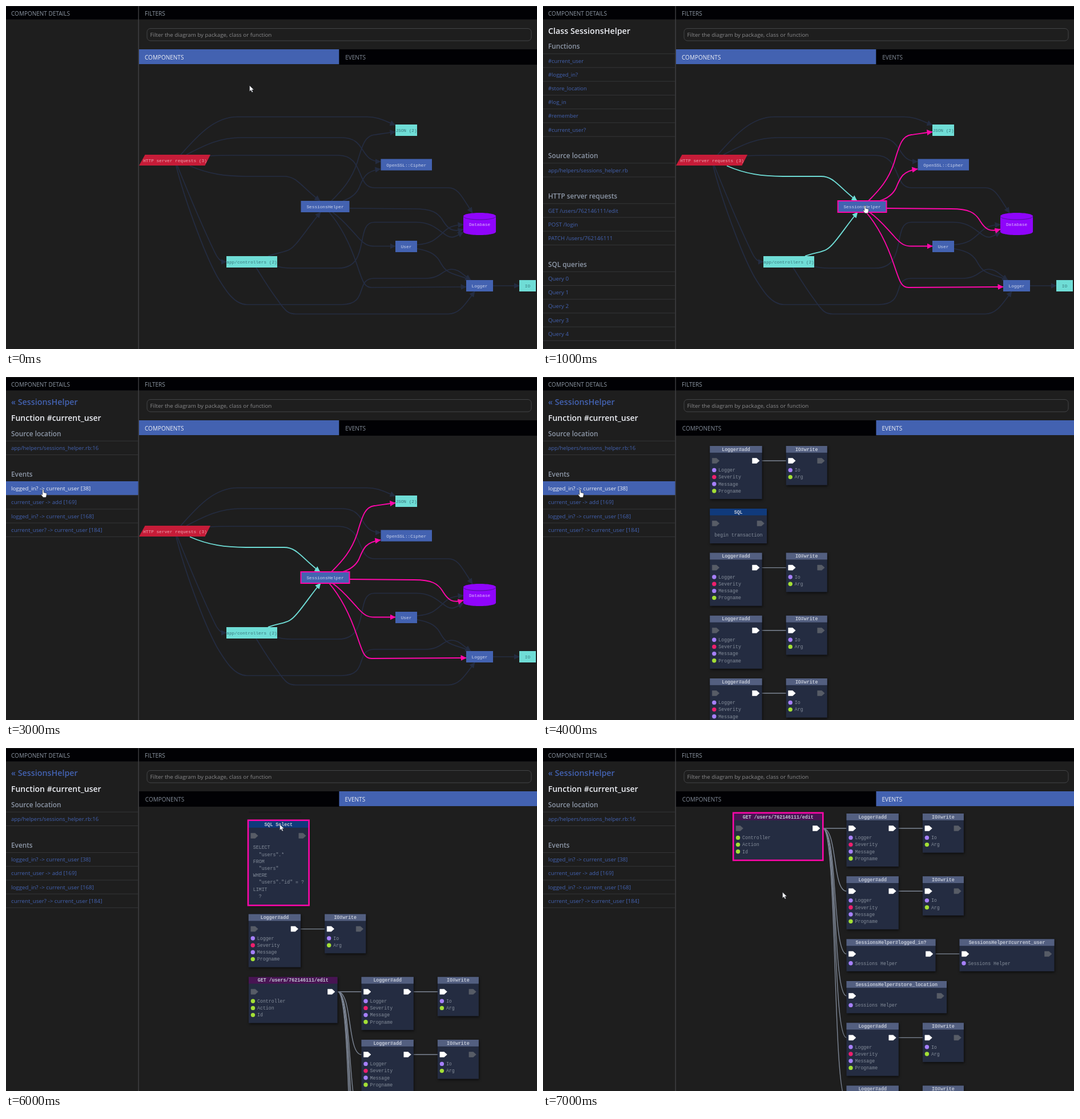
Recreate the animation shown at these times as an HTML page. Size 930 by 602 pixels, loop 8000 ms.

```html
<!DOCTYPE html>
<html lang="en">
<head>
<meta charset="utf-8">
<title>Component diagram</title>
<style>
html, body { margin: 0; width: 100%; height: 100%; overflow: hidden; background: #1e1e1e; }
svg { display: block; width: 930px; height: 602px; }
text { font-family: "Open Sans", "Noto Sans", sans-serif; white-space: pre; }
.mono { font-family: "Liberation Mono", "Courier New", monospace; }
.card { filter: drop-shadow(1px 2px 2px #0009); }
</style>
</head>
<body>
<svg id="stage" viewBox="0 0 930 602"></svg>
<script>
const BLUE = '#4362b1', PINK = '#ff07aa', TEAL = '#6fddd6', DARK = '#242c41';
const PURPLE = '#a680fb', LIME = '#a3df35', RED = '#ed1f6c', GRAY = '#848d9a', WHITE = '#eef0f6';
const stage = document.getElementById('stage');

const rect = (x, y, w, h, fill, extra = '') =>
  `<rect x="${x}" y="${y}" width="${w}" height="${h}" fill="${fill}" ${extra}/>`;
const path = (d, fill, extra = '') => `<path d="${d}" fill="${fill}" ${extra}/>`;
const text = (x, y, s, size, fill, extra = '') =>
  `<text x="${x}" y="${y}" font-size="${size}" fill="${fill}" ${extra}>${s}</text>`;
const mono = (x, y, s, size, fill, extra = '') => text(x, y, s, size, fill, 'class="mono" ' + extra);
const MIDDLE = 'text-anchor="middle"', SEMI = 'font-weight="600"';

// Page frame
function frame(eventsActive) {
  const tab = (x, w, label, on) =>
    rect(x, 76, w, on ? 26 : 27, on ? BLUE : '#010104') +
    text(x + (on ? 10 : 10.8), 93.6, label, 10, on ? WHITE : GRAY);
  return rect(0, 1, 930, 22.5, '#010104') + rect(231.5, 0, 1.3, 602, '#444548') +
    text(9, 16.8, 'COMPONENT DETAILS', 10, '#8f99a5', 'font-weight="500"') +
    text(243, 16.8, 'FILTERS', 10, '#8f99a5', 'font-weight="500"') +
    rect(247, 39.5, 673, 21.5, 'none', 'rx="6" stroke="#434446"') +
    text(252.5, 54, 'Filter the diagram by package, class or function', 9.75, '#8a8a8c') +
    tab(233, 350.5, 'COMPONENTS', !eventsActive) + tab(583.5, 346.5, 'EVENTS', eventsActive);
}

// Sidebar
function section(y, title, items, size = 9.6, active = -1) {
  const top = y + 8.3, step = 24.2;
  let out = text(9, y, title, 11.8, '#8e98a8', SEMI);
  items.forEach((item, i) => {
    const rowY = top + i * step, on = i === active;
    out += rect(0, rowY, 231.5, on ? step : 1, on ? BLUE : '#343537') +
      text(9, rowY + 16.2, item, size, on ? WHITE : BLUE);
  });
  return out + rect(0, top + items.length * step, 231.5, 1, '#343537');
}

const classPanel = active =>
  text(9, 49, 'Class SessionsHelper', 14.3, WHITE, SEMI) +
  section(75, 'Functions', ['#current_user', '#logged_in?', '#store_location', '#log_in',
    '#remember', '#current_user?'], 9.45, active) +
  section(267, 'Source location', ['app/helpers/sessions_helper.rb'], 9.52) +
  section(338, 'HTTP server requests', ['GET /users/762146111/edit', 'POST /login',
    'PATCH /users/762146111'], 9.7) +
  section(457.5, 'SQL queries', [0, 1, 2, 3, 4].map(n => 'Query ' + n), 9.75);

const functionPanel = active =>
  text(9, 49, '« SessionsHelper', 14.3, BLUE, SEMI) +
  text(9, 77, 'Function #current_user', 14, WHITE, SEMI) +
  section(103.5, 'Source location', ['app/helpers/sessions_helper.rb:16'], 9.52) +
  section(174.7, 'Events', ['logged_in? -> current_user [38]', 'current_user -> add [169]',
    'logged_in? -> current_user [168]', 'current_user? -> current_user [184]'], 9.77, active);

// Component graph
const EDGES = [
  'M306 261C335 228 365 194.5 405 194.5H633C650 194.5 660 200 682 209',
  'M316 261C350 243 375 231 412 231H588C632 231 618 273 656 273',
  'M356 263Q375 262 400 262H582C628 262 613 319 645 319H775C793 319 800 338 817 363',
  'M300 280C320 330 350 400 366 433C372 445 376 449 386 449',
  'M298 280C310 330 345 430 370 475C385 500 400 524 422 524H588C637 524 610 478 645 478H735C762 478 765 462 780 462C793 462 798 470 814 481',
  'M475 457Q485 460 500 460H582C640 460 610 379.5 645 379.5H718C748 379.5 758 395 772 403C782 409 788 404 801 397',
  'M438 459C450 478 460 495 475 515C490 537 495 540.5 508 540.5H775C795 540.5 805 522 821 501',
  'M720 419C745 417 752 410 765 398C775 388 782 385 801 383.5',
  'M720 426C745 430 755 438 762 452C773 472 785 469 814 481',
  'M853 491H899'];
const INCOMING = [
  'M322 280.5C355 295 385 299 420 299H487C510 299 518 318 550 342',
  'M459 439C475 433 490 432 497 427C510 420 532 384 551 362'];
const OUTGOING = [
  'M570 342C590 322 605 305 615 275C625 240 630 228 645 226C655 225 662 223 682 221',
  'M590 342C605 337 613 330 618 320C626 300 630 290 656 286',
  'M602 355L715 356C745 356 757 362 766 378C775 392 782 397 801 392',
  'M572 362C590 375 600 388 613 402C628 420 635 421.5 645 421.5H682',
  'M566 362C590 390 605 425 615 455C625 485 628 494 640 494L806 493'];

function graph(selected) {
  const marker = (id, color) => `<marker id="${id}" markerUnits="userSpaceOnUse" markerWidth="10"
    markerHeight="10" refX="9.5" refY="5" orient="auto">${path('M0 0L10 5L0 10z', color)}</marker>`;
  const edges = (list, id, color) => list.map(d =>
    path(d, 'none', `stroke="${color}" stroke-width="${color === DARK ? 1.7 : 1.9}" marker-end="url(#${id})"`)).join('');
  const label = (x, y, s, color) => mono(x, y, s, 7.75, color, MIDDLE);
  const node = (x, y, w, name, teal, extra) =>
    rect(x, y, w, 20, teal ? TEAL : BLUE, extra) +
    label(x + w / 2, y + 13, name, teal ? '#37777c' : '#ccd5ec');
  return marker('plain', DARK) + marker('in', TEAL) + marker('out', PINK) +
    edges(EDGES, 'plain', DARK) +
    edges(INCOMING, selected ? 'in' : 'plain', selected ? TEAL : DARK) +
    edges(OUTGOING, selected ? 'out' : 'plain', selected ? PINK : DARK) +
    path('M243.5 261H358L348.5 280H233z', '#c61c38') +
    label(296, 274, 'HTTP server requests (3)', '#eba8b2') +
    node(682, 208, 38, 'JSON (2)', true) +
    node(656.5, 268.5, 89.5, 'OpenSSL::Cipher') +
    node(516.5, 342, 85, 'SessionsHelper', false, selected ? `stroke="${PINK}" stroke-width="2"` : '') +
    node(682, 412, 38, 'User') +
    node(386, 439, 89, 'app/controllers (2)', true) +
    node(806, 481, 47, 'Logger') +
    node(899, 481, 29, 'IO', true) +
    path('M801 369v27c0 8 57 8 57 0v-27c0-8-57-8-57 0z', '#8f05fb') +
    path('M801 369c0 8 57 8 57 0', 'none', 'stroke="#4d1590"') +
    label(829.5, 386, 'Database', '#dcb9fb');
}

// Event cards
const ROW = 12.2;
const port = (x, y, on) =>
  path(`M${x} ${y - 4.5}h7.5l5 4.5l-5 4.5h-7.5z`, on ? '#fff' : '#575c66',
    `stroke="${on ? '#fff' : '#575c66'}" stroke-width=".6" stroke-linejoin="round"`);
const link = (x0, y0, x1, y1) =>
  path(`M${x0} ${y0}C${x0 + 26} ${y0} ${x1 - 25} ${y1} ${x1} ${y1}`, 'none', 'stroke="#7d8695" stroke-width="1.4"');

function card(x, y, w, h, title, { head = '#535f80', body = '', into, out, selected }) {
  return '<g class="card">' + rect(x, y, w, h, DARK) + rect(x, y, w, 11.8, head) + '</g>' +
    mono(x + w / 2, y + 8.6, title, 8.25, '#c3c9d6', 'font-weight="700" ' + MIDDLE) +
    port(x + 4, y + 26, into) + port(x + w - 17, y + 26, out) + body +
    (selected ? rect(x - .8, y - 1.2, w + 1.6, h + 2.4, 'none', `stroke="${PINK}" stroke-width="2.6"`) : '');
}

function call(x, y, w, title, params, options) {
  const body = params.map(([name, color], i) => {
    const cy = y + 42.4 + i * ROW;
    return `<circle cx="${x + 7.5}" cy="${cy}" r="3.7" fill="${color}"/>` +
      mono(x + 15, cy + 2.8, name, 8.25, GRAY);
  }).join('');
  return card(x, y, w, 44.3 + params.length * ROW, title, { ...options, body });
}

function sql(x, y, w, h, title, lines, selected) {
  const body = lines.map((line, i) => {
    const s = line.trimStart();
    return mono(x + 8 + (line.length - s.length) * 4.95, y + 49.3 + i * ROW, s, 8.25, GRAY);
  }).join('');
  return card(x, y, w, h, title, { head: '#103a7c', body, selected });
}

const logger = (x, y, { into = false, selected = false } = {}) =>
  link(x + 91, y + 26, x + 133.5, y + 26) +
  call(x, y, 91.3, 'Logger#add', [['Logger', PURPLE], ['Severity', RED], ['Message', PURPLE],
    ['Progname', LIME]], { into, out: true, selected }) +
  call(x + 133.4, y, 72, 'IO#write', [['Io', PURPLE], ['Arg', LIME]], { into: true });

function request(x, y, selected) {
  const cx = x + 197.5, tops = [0, 110.2, 220.4, 294, 367.4, 477.6].map(d => y + d);
  const helper = (hx, hy, w, name, out) =>
    call(hx, hy, w, 'SessionsHelper#' + name, [['Sessions Helper', PURPLE]], { into: true, out });
  return tops.map(t => link(x + 156, y + 26, cx, t + 26)).join('') +
    call(x, y, 155.5, 'GET /users/762146111/edit', [['Controller', LIME], ['Action', LIME], ['Id', LIME]],
      { head: '#481453', out: true, selected }) +
    [0, 1, 4, 5].map(i => logger(cx, tops[i], { into: true })).join('') +
    link(cx + 156, tops[2] + 26, cx + 198, tops[2] + 26) +
    helper(cx, tops[2], 156, 'logged_in?', true) +
    helper(cx + 198, tops[2], 166, 'current_user', false) +
    helper(cx, tops[3], 175.5, 'store_location', false);
}

const eventList = selected =>
  logger(292.3, 121, { selected }) +
  sql(292.3, 231, 99.7, 61, 'SQL', ['begin transaction']) +
  [308.6, 418.8, 529].map(y => logger(292.3, y)).join('');

const queryView = () =>
  rect(425, 111.5, 92, 2, '#181818') +
  sql(424.8, 128, 105, 147, 'SQL Select', ['SELECT', '  "users".*', 'FROM', '  "users"', 'WHERE',
    '  "users"."id" = ?', 'LIMIT', '  ?'], true) +
  logger(424.8, 291.6) + request(425, 401.8);

// Pointers
const arrow = (x, y) =>
  path(`M${x} ${y}v10.5l2.4-2.2l1.8 3.8l1.9-.9l-1.8-3.6h3.4z`, '#f4f6fb', 'stroke="#15161a" stroke-width=".5"');
const hand = (x, y) =>
  path(`M${x - 1.2} ${y + 1}q1.2-1.8 2.4 0v4.2l4.2 1q1 .3 1 1.4l-.7 4.2l-.8 2h-5l-3.4-4.6q-.2-1.4 1.2-1l1.1 1z`,
    '#fff', 'stroke="#15161a" stroke-width=".6"');

const SCENES = [
  () => frame(false) + graph(false) + arrow(426.5, 139.5),
  () => frame(false) + classPanel(-1) + graph(true) + hand(564, 350),
  () => frame(false) + classPanel(0) + graph(true) + hand(30, 96),
  () => frame(false) + functionPanel(0) + graph(true) + hand(65, 197.5),
  () => frame(true) + functionPanel(0) + eventList(false) + hand(65, 197.5),
  () => frame(true) + functionPanel(-1) + eventList(true) + arrow(326, 130),
  () => frame(true) + functionPanel(-1) + queryView() + arrow(479.5, 134),
  () => frame(true) + functionPanel(-1) + request(334, 115, true) + arrow(419.5, 253)
];

let shown = -1;
function draw() {
  const scene = Math.floor(performance.now() / 1000) % SCENES.length;
  if (scene !== shown) stage.innerHTML = SCENES[shown = scene]();
  requestAnimationFrame(draw);
}
draw();
</script>
</body>
</html>
```
